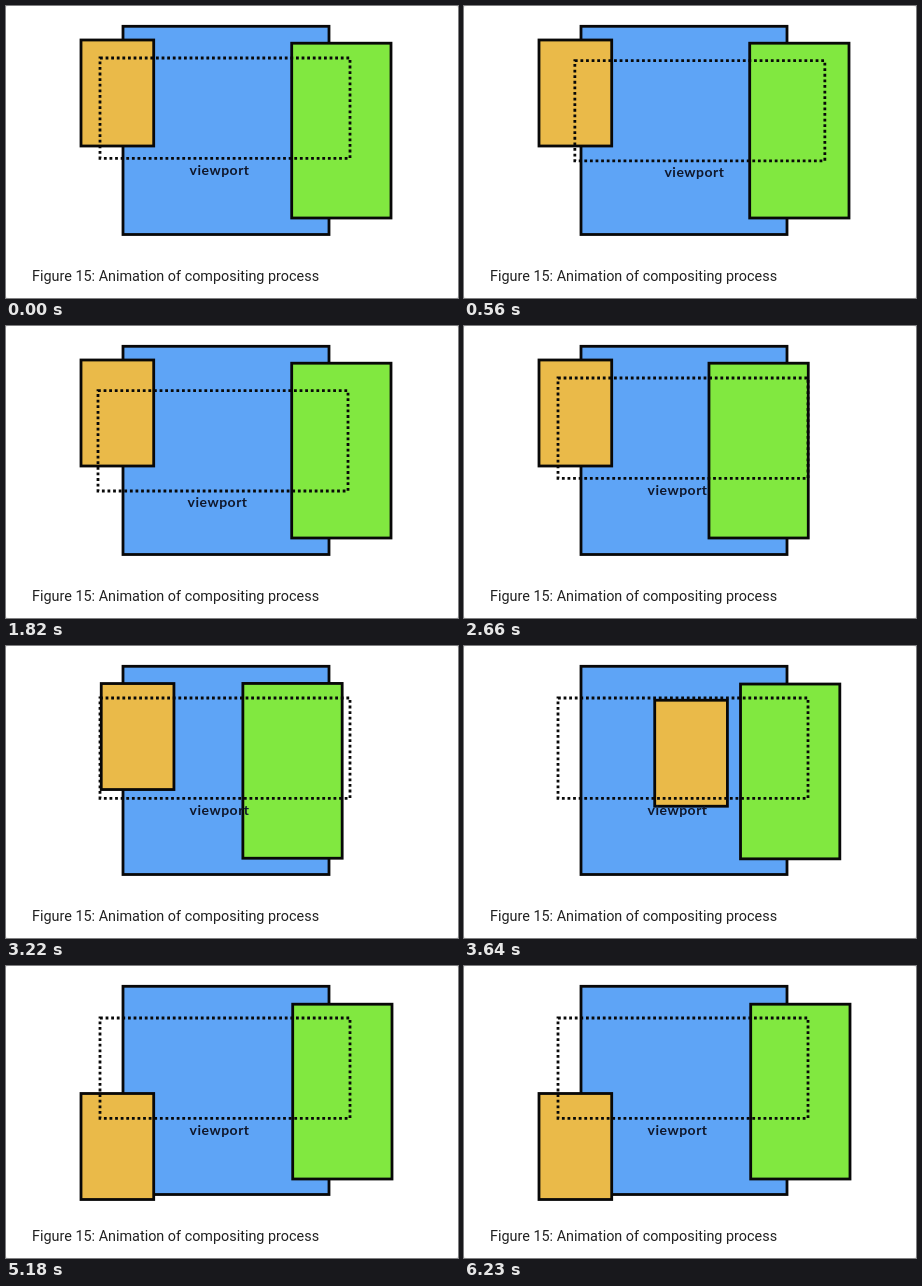
These frames come from a looping animation (452x292 px, 6.3 s). An HTML page:

```html
<!DOCTYPE html>
<html lang="en">
<head>
<meta charset="utf-8">
<title>Compositing process</title>
<style>
  html, body { margin: 0; height: 100%; overflow: hidden; background: #e4e4e4; }
  svg { display: block; width: 452px; height: 292px; background: #fff; border-radius: 3px; }
  rect { stroke: #080808; stroke-width: 2.8; }
  .frame { fill: none; stroke-dasharray: 2.8; }
  .label { font: 700 14px Lato, sans-serif; letter-spacing: .5px; fill: #10182c; text-anchor: middle; }
  .caption { font: 14.4px Roboto, sans-serif; fill: #212121; }
</style>
</head>
<body>
<svg viewBox="0 0 452 292">
  <rect x="117" y="20.3" width="206" height="208.2" fill="#5ea4f6"/>
  <rect id="green" x="285.7" y="37.2" width="99.3" height="174.8" fill="#81e840"/>
  <rect id="orange" x="75" y="34" width="72.7" height="106" fill="#eaba49"/>
  <g id="viewport">
    <rect class="frame" x="94" y="52" width="250" height="100.3"/>
    <text class="label" x="213.6" y="168.5">viewport</text>
  </g>
  <text class="caption" x="26" y="275">Figure 15: Animation of compositing process</text>
</svg>
<script>
  const LOOP = 6300;
  let t = 0;

  // Cosine ease from 0 to 1 between two times
  function glide(start, end) {
    const p = Math.min(1, Math.max(0, (t - start) / (end - start)));
    return (1 - Math.cos(Math.PI * p)) / 2;
  }

  // Rises to 1 at the peak, then falls back to 0
  const swing = (start, peak, end) => glide(start, peak) - glide(peak, end);

  function place(id, x, y) {
    document.getElementById(id).setAttribute('transform', `translate(${x} ${y})`);
  }

  function draw(now) {
    t = now % LOOP;

    const settle = glide(1850, 2300);
    place('viewport',
      81 * swing(350, 1050, 1750) - 2 * (glide(1050, 1750) - settle),
      12.7 * (glide(350, 1050) - settle));

    const back = glide(2900, 3900);
    place('green', back - 64 * swing(2320, 2900, 3900), back);

    place('orange',
      143 * swing(3000, 3900, 5120),
      25 * glide(3000, 3900) + 68.5 * glide(3900, 5120));

    requestAnimationFrame(draw);
  }
  draw(performance.now());
</script>
</body>
</html>
```
